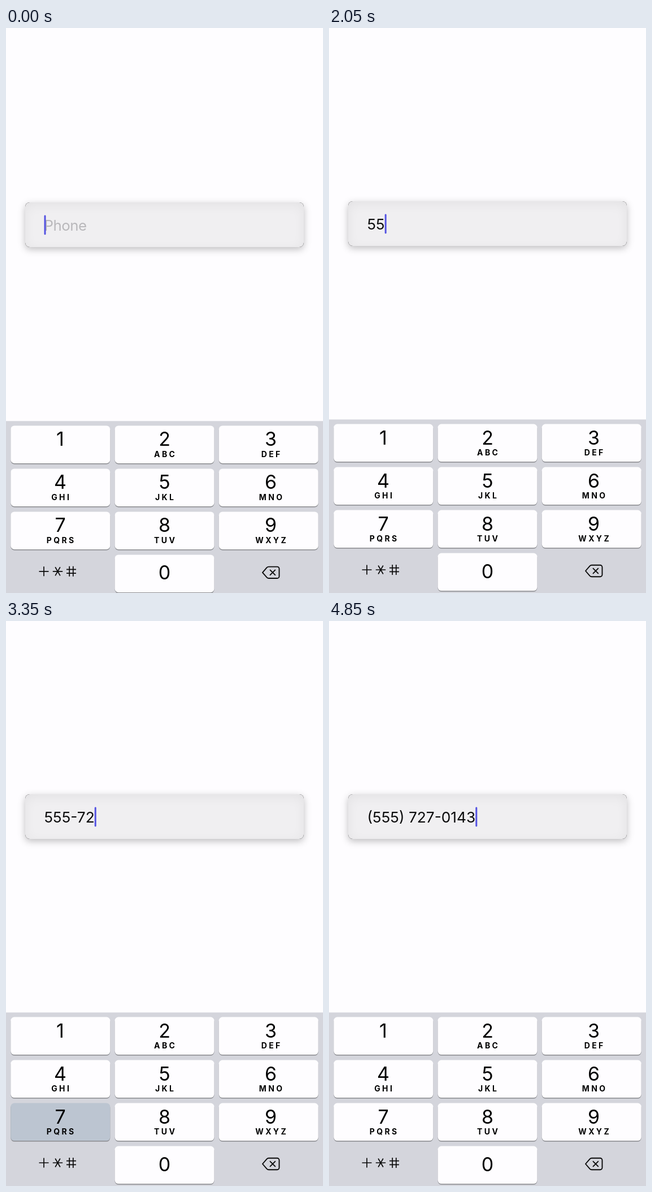
An HTML page with a canvas that plays this animation: 561x998 px, repeating every 5 s.

```html
<!DOCTYPE html>
<html lang="en">
<head>
<meta charset="utf-8">
<title>Phone field</title>
<style>
  html, body { margin: 0; width: 100%; height: 100%; overflow: hidden; background: #fefdff; }
  canvas { display: block; width: 561px; height: 998px; }
</style>
</head>
<body>
<canvas id="stage"></canvas>
<script>
const W = 561, H = 998, LOOP = 5000, STEP = 50;
const FONT = 'Inter, Roboto, sans-serif';
const canvas = document.getElementById('stage');
const ctx = canvas.getContext('2d');
const dpr = window.devicePixelRatio || 1;
canvas.width = W * dpr;
canvas.height = H * dpr;

const DIGITS = '5557270143';
// down and up time of each key press
const PRESSES = [
  [1600, 1750], [1900, 2050], [2200, 2350], [2900, 3050], [3100, 3250],
  [3350, 3500], [3650, 3800], [3950, 4150], [4400, 4550], [4700, 4850]
];
const TYPE_DELAY = 50;
const LABELS = ['', 'ABC', 'DEF', 'GHI', 'JKL', 'MNO', 'PQRS', 'TUV', 'WXYZ'];
const KEY = { w: 176, h: 66.5, r: 6.5, x0: 8.3, y0: 699.6, dx: 184.2, dy: 76 };
const CENTERS = [96, 280.5, 468.5];

const clamp = v => Math.max(0, Math.min(1, v));

function roundRect(x, y, w, h, r, fill) {
  ctx.beginPath();
  ctx.roundRect(x, y, w, h, r);
  ctx.fillStyle = fill;
  ctx.fill();
}

function text(str, x, y, font, color, align = 'left', spacing = 0) {
  ctx.font = font + ' ' + FONT;
  ctx.letterSpacing = spacing + 'px';
  ctx.textAlign = align;
  ctx.fillStyle = color;
  ctx.fillText(str, x, y);
  const width = ctx.measureText(str).width;
  ctx.letterSpacing = '0px';
  return width;
}

function lines(list) {
  ctx.beginPath();
  for (const [x1, y1, x2, y2] of list) {
    ctx.moveTo(x1, y1);
    ctx.lineTo(x2, y2);
  }
  ctx.stroke();
}

function formatPhone(d) {
  if (d.length <= 3) return d;
  if (d.length <= 7) return d.slice(0, 3) + '-' + d.slice(3);
  return `(${d.slice(0, 3)}) ${d.slice(3, 6)}-${d.slice(6)}`;
}

// Caret rests for a while after each edit, then blinks
function caretAlpha(t, lastEdit) {
  const since = t - lastEdit - 550;
  if (since < 0) return 1;
  const p = since % 1100;
  if (p < 400) return clamp(1 - (p + 50) / 200);
  return clamp((p - 350) / 250);
}

function drawField(t) {
  const typed = PRESSES.filter(p => t >= p[0] + TYPE_DELAY).length;
  const lastEdit = typed ? PRESSES[typed - 1][0] + TYPE_DELAY : -500;
  const x = 34, y = 306, w = 493, h = 79, r = 8;

  ctx.save();
  ctx.shadowColor = 'rgba(0,0,0,0.25)';
  ctx.shadowBlur = 13 * dpr;
  ctx.shadowOffsetY = 4 * dpr;
  roundRect(x, y, w, h, r, '#f0eff1');
  ctx.restore();

  // soft inner shade
  ctx.save();
  ctx.beginPath();
  ctx.roundRect(x, y, w, h, r);
  ctx.clip();
  ctx.shadowColor = 'rgba(0,0,0,0.055)';
  ctx.shadowBlur = 20 * dpr;
  ctx.shadowOffsetY = 5 * dpr;
  ctx.beginPath();
  ctx.rect(x - 60, y - 60, w + 120, h + 120);
  ctx.roundRect(x, y, w, h, r);
  ctx.fillStyle = '#000';
  ctx.fill('evenodd');
  ctx.restore();

  const left = 67.5, base = 356;
  let width = 0;
  if (typed) {
    width = text(formatPhone(DIGITS.slice(0, typed)), left, base, '400 26.3px', '#0b0b0c');
  } else {
    text('Phone', left, base, '400 25.8px', '#b9b8bb', 'left', -0.5);
  }
  ctx.globalAlpha = caretAlpha(t, lastEdit);
  roundRect(left + width, 328.5, 3, 34.7, 1.5, '#5453e2');
  ctx.globalAlpha = 1;
}

function drawKey(n, pressed) {
  const zero = n === 0;
  const col = zero ? 1 : (n - 1) % 3;
  const row = zero ? 3 : Math.floor((n - 1) / 3);
  const x = KEY.x0 + col * KEY.dx, y = KEY.y0 + row * KEY.dy;
  const cx = CENTERS[col];
  roundRect(x, y + 1.5, KEY.w, KEY.h, KEY.r, '#898a8e');
  roundRect(x, y, KEY.w, KEY.h, KEY.r, pressed ? '#bcc5d1' : '#fefdff');
  text(String(n), cx, y + (zero ? 44 : 36), '400 34px', '#000', 'center');
  if (!zero && LABELS[n - 1]) {
    text(LABELS[n - 1], cx + 1.7, y + 55.6, '700 14px', '#000', 'center', 3.4);
  }
}

function drawSymbols() {
  ctx.strokeStyle = '#0a0a0a';
  ctx.lineCap = 'butt';
  ctx.lineJoin = 'round';
  ctx.lineWidth = 1.7;
  const y = 957;
  lines([[58.5, y, 75.5, y], [67, y - 8.5, 67, y + 8.5]]);
  const star = [0, 1, 2].map(i => {
    const a = i * Math.PI / 3, dx = 8.7 * Math.cos(a), dy = 8.7 * Math.sin(a);
    return [91.5 - dx, y - dy, 91.5 + dx, y + dy];
  });
  lines(star);
  lines([
    [112.2, y - 9, 112.2, y + 9], [118.8, y - 9, 118.8, y + 9],
    [107, y - 3.4, 124, y - 3.4], [107, y + 3.4, 124, y + 3.4]
  ]);

  // backspace
  const by = 959;
  ctx.lineWidth = 1.9;
  ctx.beginPath();
  ctx.moveTo(454, by);
  ctx.lineTo(461.5, by - 8.6);
  ctx.quadraticCurveTo(463, by - 10.2, 465, by - 10.2);
  ctx.arcTo(483.5, by - 10.2, 483.5, by, 3.6);
  ctx.arcTo(483.5, by + 10.2, 465, by + 10.2, 3.6);
  ctx.lineTo(465, by + 10.2);
  ctx.quadraticCurveTo(463, by + 10.2, 461.5, by + 8.6);
  ctx.closePath();
  ctx.stroke();
  ctx.lineCap = 'round';
  lines([[467.5, by - 4.4, 476.3, by + 4.4], [476.3, by - 4.4, 467.5, by + 4.4]]);
}

function drawKeyboard(t) {
  const i = PRESSES.findIndex(p => t >= p[0] && t < p[1]);
  const active = i < 0 ? -1 : Number(DIGITS[i]);
  ctx.fillStyle = '#d4d5dc';
  ctx.fillRect(0, 691.5, W, H);
  for (let n = 0; n < 10; n++) drawKey(n, n === active);
  drawSymbols();
}

function draw(t) {
  const rise = Math.pow(1 - clamp(t / 300), 2);
  ctx.setTransform(dpr, 0, 0, dpr, 0, 0);
  ctx.fillStyle = '#fefdff';
  ctx.fillRect(0, 0, W, H);
  ctx.save();
  ctx.translate(0, 2 * rise);
  drawField(t);
  ctx.restore();
  ctx.save();
  ctx.translate(0, 2.8 * rise);
  drawKeyboard(t);
  ctx.restore();
}

let start;
function tick(now) {
  start ??= now;
  const t = Math.max(0, now - start) % LOOP;
  draw(Math.floor(t / STEP) * STEP);
  requestAnimationFrame(tick);
}
draw(0);
requestAnimationFrame(tick);
</script>
</body>
</html>
```
